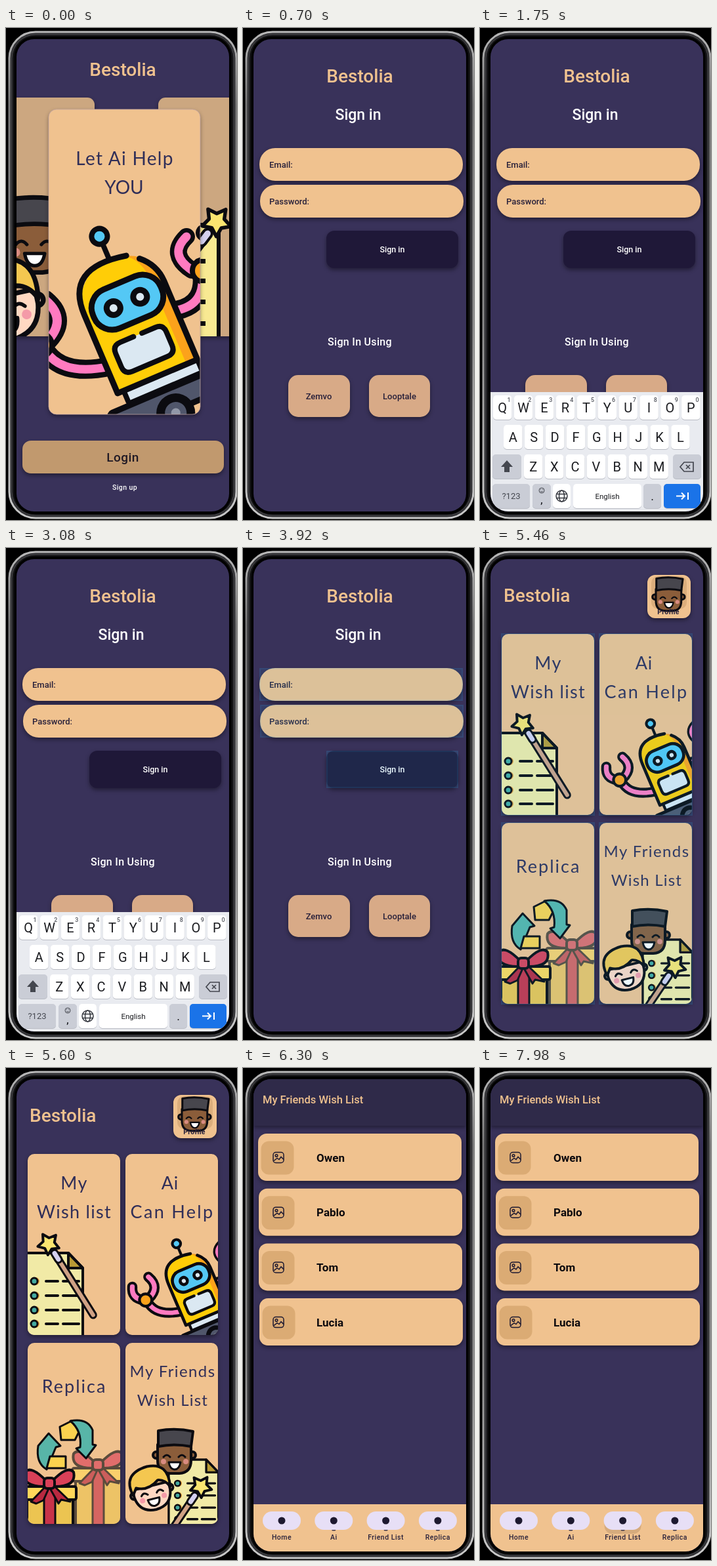
Recreate the animation shown at these times as an HTML page. Size 352 by 750 pixels, loop 8000 ms.

```html
<!DOCTYPE html>
<html lang="en">
<head>
<meta charset="utf-8">
<title>Gift app prototype</title>
<style>
html, body { margin: 0; width: 100%; height: 100%; overflow: hidden; background: #000; }
svg { display: block; }
text { font-family: Roboto, sans-serif; font-weight: 500; }
.display { font-family: Lato, sans-serif; font-weight: 400; fill: #302e58; }
.lift { filter: drop-shadow(0 3px 3px #0006); }
.ink { stroke: #0b0b10; stroke-linejoin: round; stroke-linecap: round; }
</style>
</head>
<body>
<svg id="stage" width="352" height="750" viewBox="0 0 352 750"></svg>
<script>
const SAND = '#f0c28f', NIGHT = '#39325a', BRAND = 'Bestolia';
let clips = 0;

const rect = (x, y, w, h, r, fill, more = '') =>
  `<rect x="${x}" y="${y}" width="${w}" height="${h}" rx="${r}" fill="${fill}" ${more}/>`;
const circle = (x, y, r, fill, more = '') =>
  `<circle cx="${x}" cy="${y}" r="${r}" fill="${fill}" ${more}/>`;
const path = (d, fill = 'none', width = 4, more = '') =>
  `<path class="ink" d="${d}" fill="${fill}" stroke-width="${width}" ${more}/>`;
const text = (x, y, size, fill, label, more = '') =>
  `<text x="${x}" y="${y}" font-size="${size}" fill="${fill}" ${more}>${label}</text>`;
const mid = 'text-anchor="middle"';
const display = (x, y, size, gap, label) =>
  text(x, y, size, '', label, `class="display" ${mid} letter-spacing="${gap}"`);
const place = (x, y, scale, art, turn = 0) =>
  `<g transform="translate(${x} ${y}) rotate(${turn}) scale(${scale})">${art}</g>`;
const tube = (d, outer, inner, color) =>
  path(d, 'none', outer) + path(d, 'none', inner, `style="stroke:${color}"`);

function card(x, y, w, h, r, fill, art) {
  const id = 'clip' + clips++;
  return `<clipPath id="${id}">${rect(x, y, w, h, r, '#000')}</clipPath>` +
    rect(x, y, w, h, r, fill, 'class="lift"') + `<g clip-path="url(#${id})">${art}</g>`;
}

// Robot: goggles are the origin of the tilted body
const robotBody =
  path('M0-98V-72', 'none', 8) + circle(0, -109, 12, '#54c8f5', 'class="ink" stroke-width="8"') +
  rect(-92, 146, 190, 34, 5, '#50566b', 'class="ink" stroke-width="9"') +
  circle(2, 184, 23, '#50566b', 'class="ink" stroke-width="13"') + circle(2, 184, 7, '#9298a8') +
  rect(-58, 118, 122, 25, 3, '#dbe8f2', 'class="ink" stroke-width="8"') +
  path('M-68 122V-8a66 62 0 0 1 132 0V122Z', '#ffcd07', 0) +
  path('M18-68Q47-58 46-8V122H64V-8Q62-58 18-68Z', '#fca21b', 0, 'style="stroke:none"') +
  path('M26-66Q-68-86-68-8V122H64V-8Q64-35 43-54', 'none', 9) +
  rect(-56, -32, 112, 64, 30, '#54c8f5', 'class="ink" stroke-width="9"') +
  [-23, 21].map(x => circle(x, 0, 15, '#0b0b10') + circle(x, 0, 6, '#dbe8f2')).join('') +
  path('M-12 52H-34q-13 0-13 13v22q0 13 13 13H24q13 0 13-13V65q0-13-13-13H2', '#dbe8f2', 8);
const PINK = '#ff7ac0';
const robot =
  tube('M58 488Q82 532 158 516', 29, 13, PINK) +
  tube('M13 444Q10 478 45 483', 30, 14, PINK) +
  tube('M60 415Q96 445 60 480', 30, 14, PINK) +
  circle(52, 483, 18, '#fca21b', 'class="ink" stroke-width="8"') +
  tube('M298 370Q306 420 262 430', 29, 13, PINK) +
  tube('M275 318Q247 345 283 369', 26, 13, PINK) +
  tube('M302 312Q333 335 306 366', 26, 13, PINK) +
  circle(301, 370, 17, '#fca21b', 'class="ink" stroke-width="8"') +
  place(185, 418, 1, robotBody, -23);

const darkFace =
  circle(-27, 10, 5, '#8b5d3a', 'class="ink" stroke-width="4"') +
  circle(28, 10, 5, '#8b5d3a', 'class="ink" stroke-width="4"') +
  path('M-25-6V18Q-25 37-6 38H8Q26 37 26 18V-6Z', '#8b5d3a') +
  path('M-24-27Q2-32 29-26L26-3Q0-8-24-3Z', '#47464d') +
  path('M-16 13q5-6 10 0M7 13q5-6 10 0', 'none', 3) +
  circle(-16, 20, 4, '#d98b80') + circle(18, 20, 4, '#d98b80') +
  path('M-8 21H10Q8 32 1 32T-8 21Z', '#fff', 3);
const paleFace =
  circle(-28, 5, 5, '#ffd5bd', 'class="ink" stroke-width="4"') +
  circle(28, 5, 5, '#ffd5bd', 'class="ink" stroke-width="4"') +
  path('M-28-4V8Q-25 32 0 33 25 32 28 8V-4Z', '#ffd8c2') +
  path('M-29 4Q-38-32 2-34 35-33 29 4 24-8 13-10-5 3-22-6Z', '#f4c750') +
  path('M-17 8q5-6 10 0M7 8q5-6 10 0', 'none', 3) +
  circle(-17, 15, 4, '#f49aa8') + circle(17, 15, 4, '#f49aa8') +
  path('M-9 16H9Q8 27 0 27T-9 16Z', '#fff', 3);

const starPoints = Array.from({ length: 10 }, (_, i) => {
  const a = i * Math.PI / 5 - Math.PI / 2, r = i % 2 ? 9 : 17;
  return [r * Math.cos(a), r * Math.sin(a)].map(v => v.toFixed(1));
}).join(' L');
const wand = tube('M0 18V128', 12, 6, '#cfa184') + tube('M0 17V28', 13, 7, '#d4d0ef') +
  path(`M${starPoints}Z`, '#fbe570', 4);

const list =
  path('M-6 0H62L84 23V140H-6Z', '#f1eaa6', 4) + path('M62 0V23H84Z', '#b99a35', 4) +
  [43, 65, 87, 108].map(y => circle(12, y, 6, '#e7a33e') +
    circle(10, y, 5, '#43a9a0', 'class="ink" stroke-width="3"') +
    path(`M28 ${y}h18m8 0h24`, 'none', 4)).join('');

const gift =
  rect(-34, 18, 70, 90, 2, '#ecc451', 'class="ink" stroke-width="4"') +
  rect(-39, 8, 80, 20, 3, '#ffd75a', 'class="ink" stroke-width="4"') +
  rect(-8, 8, 17, 110, 0, '#c83349', 'class="ink" stroke-width="3"') +
  path('M-3 5L-28 31-20 34-9 29 0 9 14 34 18 28 32 31 5 5Z', '#b92940', 3) +
  path('M-4 0Q-28-25-37-14-42 9-6 8ZM4 0Q28-25 37-14 42 9 6 8Z', '#d94058', 4) +
  rect(-8, -5, 16, 16, 5, '#d94058', 'class="ink" stroke-width="4"');

const recycle =
  path('M82 547L100 538 113 551 105 567H84Z', '#fbd24f', 3) +
  path('M98 538Q124 533 132 552V574L137 575 122 595 107 580 113 578Q116 553 98 538Z', '#58b5a8', 3) +
  path('M65 557L83 576 76 578 62 612Q45 602 49 576Z', '#58b5a8', 3) +
  path('M67 592H91V610H62Z', '#fbd24f', 3);

const sideArt = place(42, 308, 1.7, darkFace) + place(-5, 416, 1.85, paleFace, -12);
const welcome =
  text(178, 73, 28, SAND, BRAND, mid) +
  card(0, 106, 135, 364, 11, '#cca780', sideArt) +
  card(232, 106, 130, 364, 11, '#cca780',
    rect(270, 300, 54, 180, 0, '#f8e992', 'class="ink" stroke-width="6"') +
    [352, 382, 414, 447].map(y => rect(292, y, 12, 7, 0, '#0b0b10')).join('') +
    place(321, 295, 1.35, wand, 37)) +
  card(65, 124, 231, 465, 12, SAND,
    display(181, 209, 28, 1.3, 'Let Ai Help') + display(180, 253, 28, 0, 'YOU') + robot) +
  rect(65, 124, 231, 465, 12, 'none', 'stroke="#c2a5a3" stroke-width=".8"') +
  rect(25, 629, 307, 50, 13, '#c1996e', 'class="lift"') +
  text(178, 661, 19, '#211a25', 'Login', mid + ' letter-spacing=".4"') +
  text(181, 704, 10.5, '#fff', 'Sign up', mid + ' letter-spacing=".4"');

const hint = (x, y, w, h) =>
  rect(x, y, w, h, 0, '#21bbff', 'fill-opacity=".5" stroke="#27aef0" stroke-width="2"');

const signIn =
  text(178, 83, 28, SAND, BRAND, mid) +
  text(175.5, 140, 23, '#fff', 'Sign in', mid) +
  rect(25, 183, 310, 50, 24, SAND, 'class="lift"') +
  rect(26, 239, 310, 50, 24, SAND, 'class="lift"') +
  text(40, 213, 13, '#28203a', 'Email:') + text(40, 269, 13, '#28203a', 'Password:') +
  rect(127, 309, 201, 57, 12, '#1f1838', 'class="lift"') +
  text(227.5, 342, 12.5, '#fff', 'Sign in', mid) +
  text(178, 483.5, 16, '#fff', 'Sign In Using', mid + ' letter-spacing=".3"') +
  rect(69, 529, 94, 64, 15, '#d8aa87', 'class="lift"') +
  rect(192, 529, 93, 64, 15, '#d8aa87', 'class="lift"') +
  text(115.5, 566, 13, '#28203a', 'Zemvo', mid) + text(238.5, 566, 13, '#28203a', 'Looptale', mid) +
  `<g class="hint">${hint(26, 184, 308, 48)}${hint(27, 240, 308, 48)}${hint(128, 310, 199, 55)}</g>`;

const key = (x, y, w, fill = '#fff', label = '', size = 20, color = '#1b1c20') =>
  rect(x, y + 1, w, 37, 5, '#b9bcc4') + rect(x, y, w, 37, 5, fill) +
  text(x + w / 2, y + 18.5 + size * .36, size, color, label, mid + ' style="font-weight:400"');
const keyRow = (letters, x, y) =>
  [...letters].map((c, i) => key(x + i * 31.9, y, 28.5, '#fff', c)).join('');
const GRAY = '#cacdd6';
const keyboard =
  rect(16, 555, 324, 182, 0, '#e9ebf0') +
  keyRow('QWERTYUIOP', 20, 560) + keyRow('ASDFGHJKL', 36, 605) + keyRow('ZXCVBNM', 67, 650) +
  [...'1234567890'].map((n, i) => text(44 + i * 31.9, 570, 9, '#555860', n, mid)).join('') +
  key(19, 650, 44, GRAY) + '<path d="M41 659l9 10h-5v8h-8v-8h-5z" fill="#44474f"/>' +
  key(294, 650, 43, GRAY) +
  '<path d="M305 669l6-7h14v14h-14zM314 666l6 6m0-6l-6 6" fill="none" stroke="#44474f" stroke-width="1.7"/>' +
  key(19, 695, 57, GRAY, '?123', 13, '#44474f') + key(80, 695, 28, GRAY) +
  '<g fill="none" stroke="#44474f"><circle cx="94" cy="705" r="4"/><path d="M92 706q2 2.5 4 0M92.5 703v1m3-1v1"/></g>' +
  text(94, 725, 15, '#1b1c20', ',', mid) + key(111, 695, 27) +
  '<g fill="none" stroke="#33363d" stroke-width="1.5"><circle cx="124.5" cy="713.5" r="8.5"/><ellipse cx="124.5" cy="713.5" rx="4" ry="8.5"/><path d="M117 710.5h15m-15 6h15"/></g>' +
  key(142, 695, 104, '#fff', 'English', 11.5) + key(249, 695, 27, GRAY, '.', 18) +
  key(280, 695, 56, '#1a73e8') +
  '<path d="M299 713.5h13m-5-5l5 5-5 5M317 708v11" fill="none" stroke="#fff" stroke-width="2"/>';

const tiles = [131, 419].flatMap(y => [33, 182].map(x => [x, y, 141, 276]));
const tileArt = [
  display(104, 185, 27, 1.3, 'My') + display(104, 229, 27, 1.3, 'Wish list') +
    place(33, 282, 1, list) + place(65, 268, 1, wand, -32),
  display(250, 185, 27, 1, 'Ai') + display(253.5, 229, 27, 2.3, 'Can Help') +
    place(258 - 139 * .52, 269 - 320 * .52, .52, robot),
  display(104, 495, 27, 2, 'Replica') +
    `<g opacity=".65">${place(140, 602, 1, gift)}</g>` + recycle + place(66, 630, 1, gift),
  display(254, 471, 24, 1.4, 'My Friends') + display(254, 515, 24, 1.2, 'Wish List') +
    place(253, 597, .84, list) + place(297, 638, 1, wand, 34) +
    place(256, 580, 1, darkFace) + place(221, 641, 1, paleFace, -14)
];
const home =
  text(36, 82, 28, SAND, BRAND) +
  rect(255, 41, 66, 66, 12, SAND, 'class="lift"') +
  rect(261, 43, 54, 50, 10, '#dcae7c') + place(287, 67, .76, darkFace) +
  text(287, 101, 10.5, '#28203a', 'Profile', mid + ' style="font-weight:700" letter-spacing=".3"') +
  tiles.map((t, i) => card(...t, 10, SAND, tileArt[i])).join('') +
  `<g class="hint">${tiles.map(t => hint(...t)).join('')}</g>`;

const icon = '<g fill="none" stroke="#1d1930" stroke-width="1.5"><rect x="-8" y="-8" width="16" height="16" rx="4"/>' +
  '<circle cx="-3" cy="-3" r="1.8"/><path d="M-7 5l5-4 3 2 3-4 4 4"/></g>';
const friend = (name, i) => {
  const x = [23, 24, 24, 25][i], y = 100 + i * 83.7;
  return rect(x, y, 310, 72, 13, SAND, 'class="lift"') +
    rect(x + 4.5, y + 11.5, 50, 51, 12, '#dbab74') + place(54, y + 36.5, 1, icon) +
    text(112, y + 42.5, 17, '#0c090d', name, 'style="font-weight:600"');
};
const tab = (label, i) => {
  const x = 59 + i * 79.3;
  return (i === 2 ? rect(x - 28, 681, 56, 29, 12, '#d6ab7d', 'id="press"') : '') +
    (i ? rect(x - 3, 702, 6, 3.5, 1.5, '#40384a') : '') +
    rect(x - 29, 676, 58, 28, 14, '#e7dff6') + circle(x, 690, 5.5, '#1d1930') +
    text(x, 718.5, 10.5, '#28203a', label, mid + ' letter-spacing=".5"');
};
const friends =
  rect(16, 17, 324, 71, 0, '#2f2a49', 'class="lift"') +
  text(30, 54, 16.5, SAND, 'My Friends Wish List') +
  ['Owen', 'Pablo', 'Tom', 'Lucia'].map(friend).join('') +
  rect(16, 665, 324, 72, 0, SAND) + ['Home', 'Ai', 'Friend List', 'Replica'].map(tab).join('');

const pages = { welcome, signIn, keyboard, home, friends };
const stage = document.getElementById('stage');
stage.innerHTML =
  `<defs><clipPath id="screen">${rect(16, 17, 324, 720, 27, '#000')}</clipPath>
  <linearGradient id="metal" x2="0" y2="1"><stop stop-color="#b8b8b8"/><stop offset=".15" stop-color="#777"/>
  <stop offset=".6" stop-color="#8a8a8a"/><stop offset="1" stop-color="#c8c8c8"/></linearGradient></defs>` +
  rect(5, 6, 346, 741, 40, '#303033', 'stroke="url(#metal)" stroke-width="3"') +
  rect(9, 10, 338, 733, 36, '#141416', 'stroke="#4b4b4e"') +
  rect(12.5, 13, 331, 728, 31, '#000') +
  '<g clip-path="url(#screen)">' + rect(16, 17, 324, 720, 0, NIGHT) +
  Object.entries(pages).map(([id, art]) => `<g id="${id}">${art}</g>`).join('') + '</g>';

const node = Object.fromEntries([...Object.keys(pages), 'press'].map(id => [id, document.getElementById(id)]));
const hints = document.querySelectorAll('.hint');
const clamp = v => v < 0 ? 0 : v > 1 ? 1 : v;
const show = (id, on) => node[id].style.display = on ? '' : 'none';
const start = performance.now();

function draw() {
  const t = (performance.now() - start) % 8000;
  show('welcome', t < 70);
  show('signIn', t >= 70 && t < 5250);
  show('keyboard', t >= 1750 && t < 3920);
  show('home', t >= 5250 && t < 6300);
  show('friends', t >= 6300);
  const glow = t < 3920 ? 0 : Math.min(clamp((t - 3860) / 340), clamp((5600 - t) / 800));
  hints.forEach(h => h.setAttribute('opacity', glow));
  node.press.setAttribute('opacity', clamp((t - 7490) / 420));
  requestAnimationFrame(draw);
}
draw();
</script>
</body>
</html>
```
